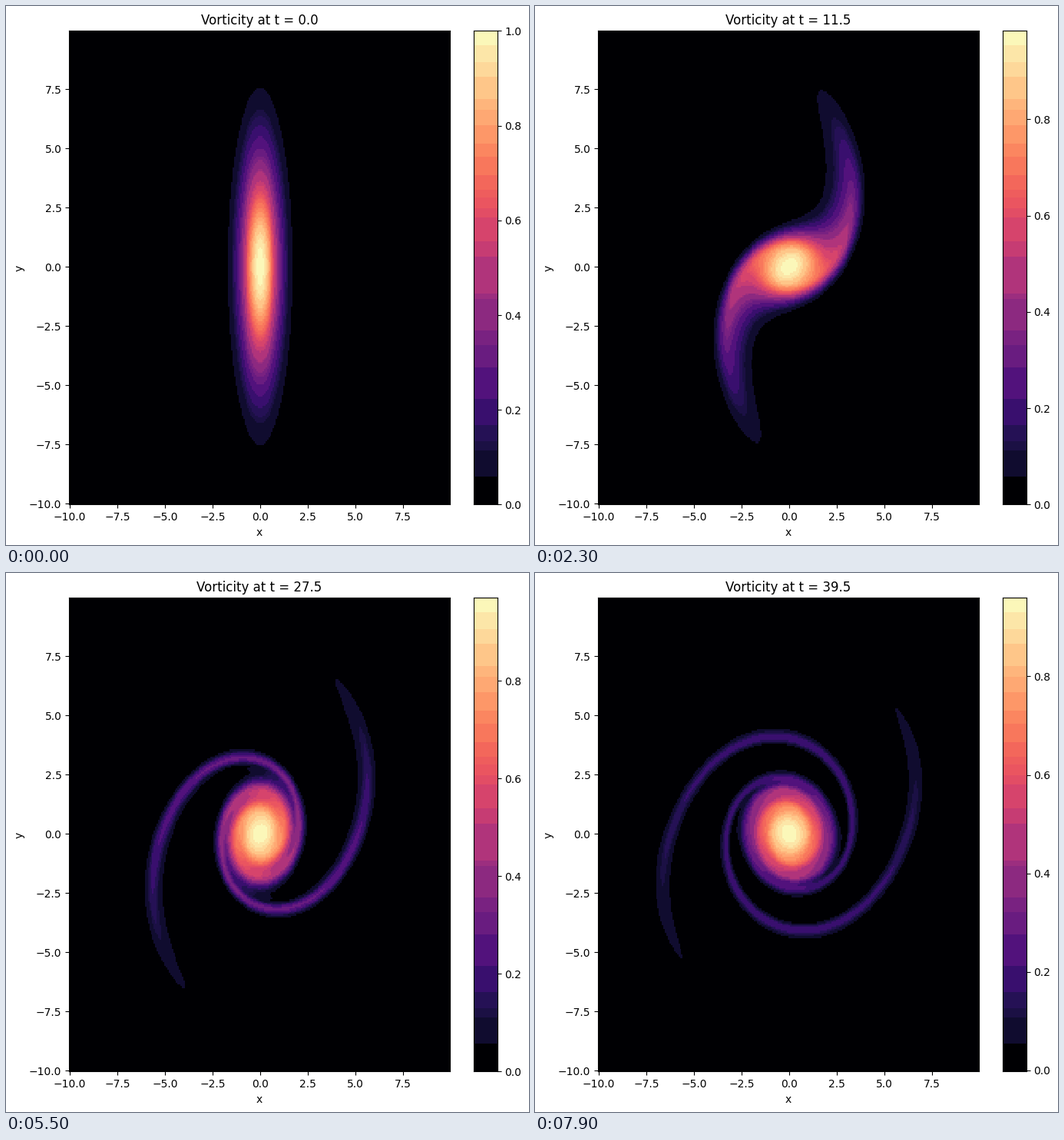
Write a matplotlib script that moves like this. It is 681 px wide and 701 px high and loops after 8000 ms.

```python
import numpy as np
import matplotlib.pyplot as plt
from matplotlib.animation import FuncAnimation
from matplotlib.colors import ListedColormap

W, H, DPI = 681, 701, 100
FRAMES, INTERVAL = 80, 100
FRAME_DT, SUBSTEPS = 0.5, 3
L, NU, N = 20.0, 0.001, 256
DX = L / N

plt.rcParams["font.family"] = "DejaVu Sans"

# Inverse Laplacian on the periodic box
kx = 2 * np.pi / L * np.arange(N // 2 + 1)[None, :]
ky = 2 * np.pi / L * np.fft.fftfreq(N, 1 / N)[:, None]
k2 = kx**2 + ky**2
inv_lap = -np.divide(1, k2, out=np.zeros_like(k2), where=k2 > 0)


def neighbours(f):
    """Values to the east, west, north and south of each point."""
    return (np.roll(f, -1, 1), np.roll(f, 1, 1),
            np.roll(f, -1, 0), np.roll(f, 1, 0))


def rhs(w):
    """Vorticity tendency with second-order central differences."""
    psi = np.fft.irfft2(inv_lap * np.fft.rfft2(w), s=(N, N))
    pe, pw, pn, ps = neighbours(psi)
    we, ww, wn, ws = neighbours(w)
    jacobian = ((pe - pw) * (wn - ws) - (pn - ps) * (we - ww)) / (4 * DX**2)
    laplacian = (we + ww + wn + ws - 4 * w) / DX**2
    return jacobian + NU * laplacian


def rk4(w, dt):
    a = rhs(w)
    b = rhs(w + dt / 2 * a)
    c = rhs(w + dt / 2 * b)
    d = rhs(w + dt * c)
    return w + dt / 6 * (a + 2 * b + 2 * c + d)


def simulate():
    x = -L / 2 + DX * np.arange(N)
    w = np.exp(-x[None, :]**2 - x[:, None]**2 / 20)
    fields = [w]
    for _ in range(FRAMES - 1):
        for _ in range(SUBSTEPS):
            w = rk4(w, FRAME_DT / SUBSTEPS)
        fields.append(w)
    return fields


def banded_magma():
    """Magma reduced to uneven flat bands."""
    edges = [0, 15, 29, 34, 43, 57, 74, 86, 94, 111, 114, 134, 142, 155, 160,
             166, 170, 178, 188, 195, 205, 213, 219, 231, 239, 248, 256]
    magma = plt.get_cmap("magma")
    colors = []
    for lo, hi in zip(edges, edges[1:]):
        mid = (lo + hi) // 2 if lo else 0
        colors += [magma(mid)] * (hi - lo)
    return ListedColormap(colors)


def px_axes(left, bottom, width, height):
    return fig.add_axes([left / W, bottom / H, width / W, height / H])


fields = simulate()
cmap = banded_magma()
fig = plt.figure(figsize=(W / DPI, H / DPI), dpi=DPI, facecolor="white")

ax = px_axes(82.1, 52.6, 496, 616)
lo, hi = -L / 2 - DX / 2, L / 2 - DX / 2
image = ax.imshow(fields[0], cmap=cmap, origin="lower", aspect="auto",
                  interpolation="nearest", extent=(lo, hi, lo, hi))
ticks = np.arange(-10, 7.6, 2.5)
ax.set(xticks=ticks, yticks=ticks, xlim=(lo, hi), ylim=(lo, hi),
       xlabel="x", ylabel="y")
title = ax.set_title("")

cax = px_axes(609.1, 52.6, 30.8, 616)
bar = cax.imshow(np.arange(256)[:, None], cmap=cmap, origin="lower",
                 aspect="auto", interpolation="nearest", extent=(0, 1, 0, 1))
levels = [0, 0.2, 0.4, 0.6, 0.8, 1.0]
cax.set_xticks([])
cax.set_yticks(levels, [f"{v:.1f}" for v in levels])
cax.yaxis.tick_right()


def update(i):
    w = fields[i]
    vmin = min(round(float(w.min()), 6), 0.0)
    vmax = round(float(w.max()), 6)
    image.set_data(w)
    image.set_clim(vmin, vmax)
    bar.set_extent((0, 1, vmin, vmax))
    cax.set_ylim(vmin, vmax)
    title.set_text(f"Vorticity at t = {FRAME_DT * i:.1f}")
    return image, bar, title


anim = FuncAnimation(fig, update, frames=FRAMES, interval=INTERVAL,
                     repeat=True, repeat_delay=0, blit=False)
plt.show()
```
